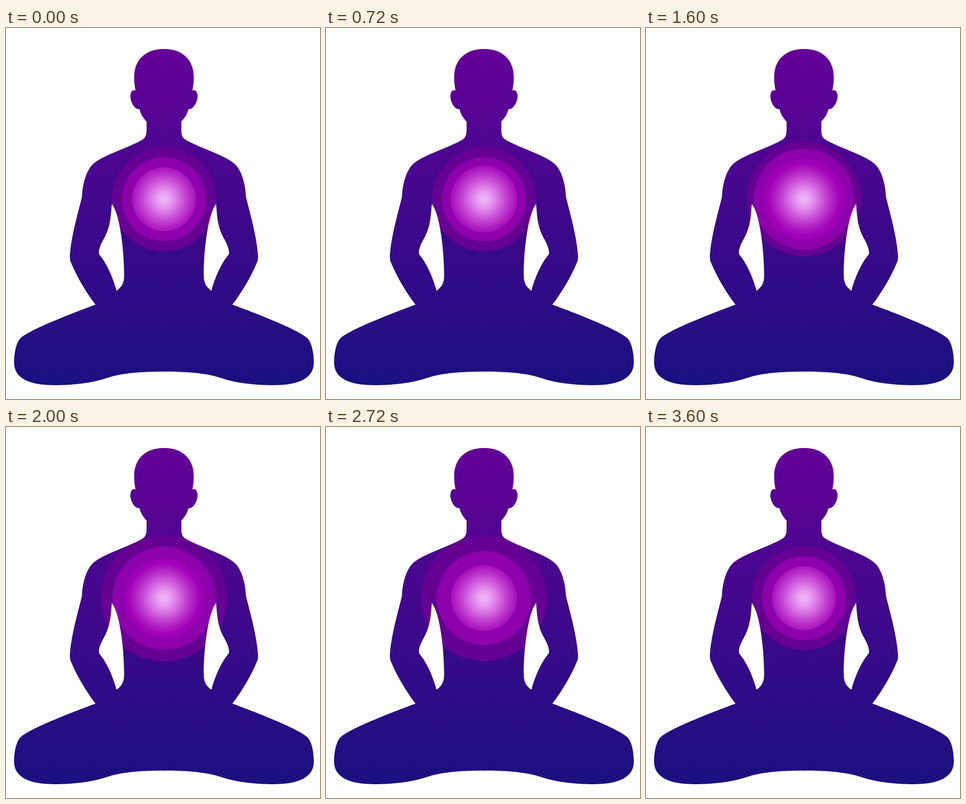
Animation, 659 px wide and 778 px high, one loop 3640 ms. Source, as an HTML page with a canvas:

```html
<!DOCTYPE html>
<html lang="en">
<head>
<meta charset="utf-8">
<style>
html, body { margin: 0; width: 100%; height: 100%; overflow: hidden; background: #fff; }
canvas { display: block; }
</style>
</head>
<body>
<canvas id="stage" width="659" height="778"></canvas>
<script>
const ctx = document.getElementById('stage').getContext('2d');
const LOOP = 3640, STEP = 40, RAMP = 1240;
const CX = 331.5, CY = 359;

// Left half of the seated figure, with the opening between arm and torso.
// It reaches just past the axis so that the two halves overlap.
const half = new Path2D(`
  M333 44 L331 44 C290 44 269 70 269 102 C269 114 270 123 272 131
  C265 128 261 135 261 143 C261 155 270 172 280 170
  C283 182 289 190 295 196 L295 213 C295 224 293 229 288 233
  C262 250 200 267 181 287 C169 299 160 328 159.500 354
  C150 392 136 440 134 480 L134.500 487
  C145 515 168 555 188 580
  C140 598 50 632 30 651 C20 662 17 685 17 702
  C17 735 50 749 100 749 C150 749 185 743 215 733
  C245 723 290 720.500 331 720.500 L333 720.500 Z
  M222 369 C220 400 218 415 209 435 C202 449 194 460 195 474
  C212 494 225 525 232 551 C243 543 248 535 248 518
  C248 470 240 392 222 369 Z`);

const mirrored = new Path2D();
mirrored.addPath(half, new DOMMatrix([-1, 0, 0, 1, 2 * CX, 0]));

function withStops(gradient, stops) {
  for (const [at, color] of stops) gradient.addColorStop(at, color);
  return gradient;
}

const skin = withStops(ctx.createLinearGradient(0, 44, 0, 749), [
  [0, '#640098'], [1, '#1a1080']
]);

const glow = withStops(ctx.createRadialGradient(CX, CY, 0, CX, CY, 76), [
  [0, '#f0b8fa'], [0.2, '#e89cf2'], [0.4, '#d870e4'],
  [0.6, '#c446d2'], [0.8, '#b020c2'], [1, '#a000b8']
]);

// Each disc swells from its rest radius, holds, then shrinks back.
const discs = [
  { rest: 109, swell: 27, grow: 1060, shrink: 2400, fill: '#660092' },
  { rest: 88, swell: 20, grow: 651, shrink: 2120, fill: '#8e00ac' },
  { rest: 67, swell: 17.5, grow: 380, shrink: 1750, fill: glow }
];

function ease(t, start) {
  const u = Math.min(1, Math.max(0, (t - start) / RAMP));
  return (1 - Math.cos(Math.PI * u)) / 2;
}

function draw(t) {
  ctx.clearRect(0, 0, 659, 778);
  ctx.globalCompositeOperation = 'source-over';
  ctx.fillStyle = skin;
  ctx.fill(half, 'evenodd');
  ctx.fill(mirrored, 'evenodd');

  // The discs show only on the body.
  ctx.globalCompositeOperation = 'source-atop';
  for (const { rest, swell, grow, shrink, fill } of discs) {
    const radius = rest + swell * (ease(t, grow) - ease(t, shrink));
    ctx.beginPath();
    ctx.arc(CX, CY, radius, 0, 2 * Math.PI);
    ctx.fillStyle = fill;
    ctx.fill();
  }
}

const begin = performance.now();
function tick() {
  const t = (performance.now() - begin) % LOOP;
  draw(Math.floor(t / STEP) * STEP);
  requestAnimationFrame(tick);
}
tick();
</script>
</body>
</html>
```
